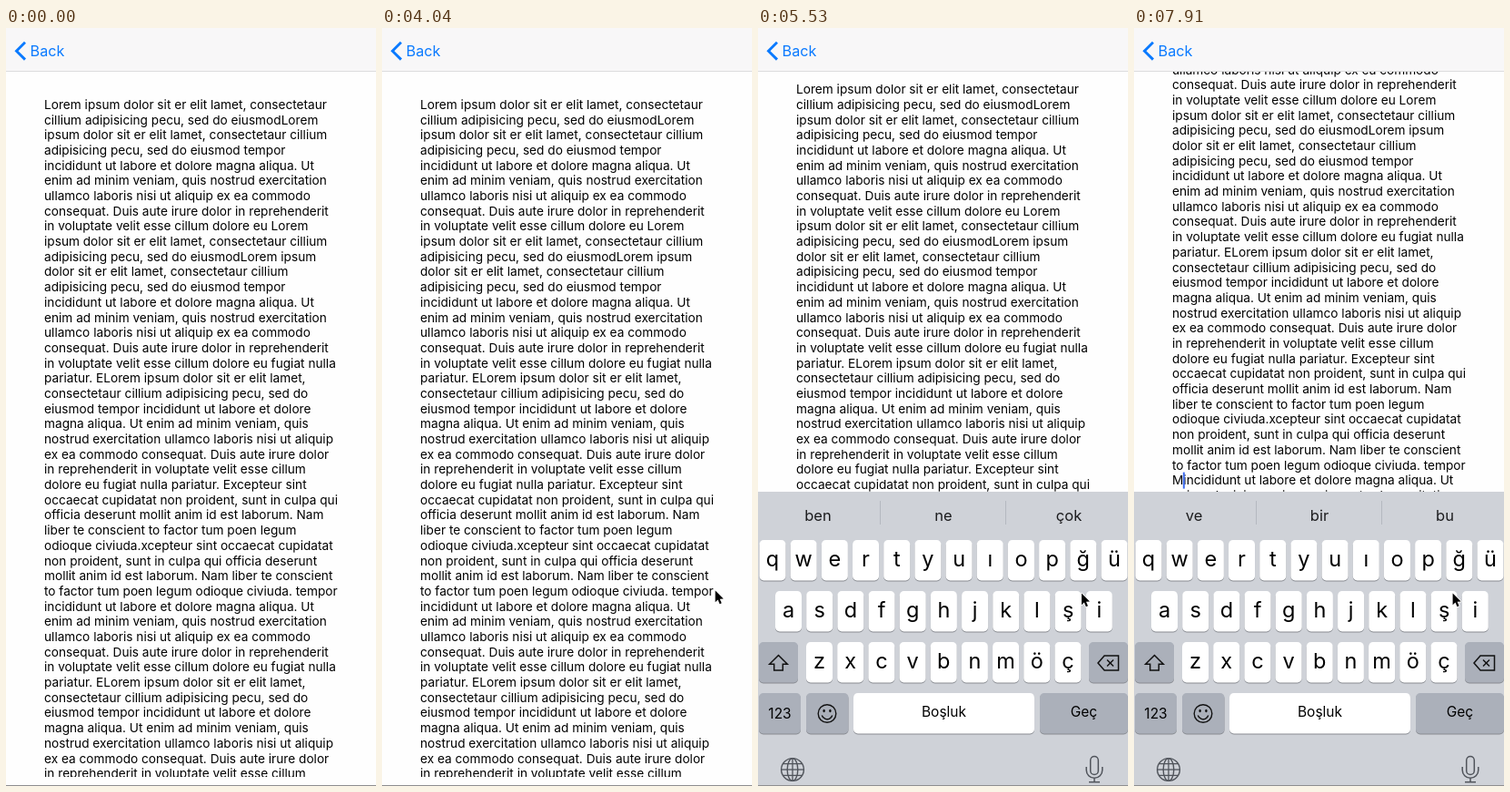
Write an HTML page with a canvas that moves like this. It is 407x832 px and loops after 8000 ms.

```html
<!DOCTYPE html>
<html lang="en">
<head>
<meta charset="utf-8">
<title>Text view with keyboard</title>
<style>
  html, body { margin: 0; width: 100%; height: 100%; overflow: hidden; background: #fefefe; }
  canvas { display: block; width: 407px; height: 832px; }
</style>
</head>
<body>
<canvas id="stage"></canvas>
<script>
const W = 407, H = 832, LOOP = 8000, STEP = 149.4;
const canvas = document.getElementById('stage');
const ctx = canvas.getContext('2d');
const ratio = window.devicePixelRatio || 1;
canvas.width = W * ratio;
canvas.height = H * ratio;

const FAMILY = 'Inter, "Liberation Sans", sans-serif';
const BLUE = '#0a7aff', ICON = '#50545b';
const BODY_SIZE = 13.67, TEXT_X = 42, FIRST_BASELINE = 88.85, LINE_HEIGHT = 16.69;
const KEYBOARD_TOP = 509, KEYBOARD_HEIGHT = H - KEYBOARD_TOP;

const lines = `Lorem ipsum dolor sit er elit lamet, consectetaur
cillium adipisicing pecu, sed do eiusmodLorem
ipsum dolor sit er elit lamet, consectetaur cillium
adipisicing pecu, sed do eiusmod tempor
incididunt ut labore et dolore magna aliqua. Ut
enim ad minim veniam, quis nostrud exercitation
ullamco laboris nisi ut aliquip ex ea commodo
consequat. Duis aute irure dolor in reprehenderit
in voluptate velit esse cillum dolore eu Lorem
ipsum dolor sit er elit lamet, consectetaur cillium
adipisicing pecu, sed do eiusmodLorem ipsum
dolor sit er elit lamet, consectetaur cillium
adipisicing pecu, sed do eiusmod tempor
incididunt ut labore et dolore magna aliqua. Ut
enim ad minim veniam, quis nostrud exercitation
ullamco laboris nisi ut aliquip ex ea commodo
consequat. Duis aute irure dolor in reprehenderit
in voluptate velit esse cillum dolore eu fugiat nulla
pariatur. ELorem ipsum dolor sit er elit lamet,
consectetaur cillium adipisicing pecu, sed do
eiusmod tempor incididunt ut labore et dolore
magna aliqua. Ut enim ad minim veniam, quis
nostrud exercitation ullamco laboris nisi ut aliquip
ex ea commodo consequat. Duis aute irure dolor
in reprehenderit in voluptate velit esse cillum
dolore eu fugiat nulla pariatur. Excepteur sint
occaecat cupidatat non proident, sunt in culpa qui
officia deserunt mollit anim id est laborum. Nam
liber te conscient to factor tum poen legum
odioque civiuda.xcepteur sint occaecat cupidatat
non proident, sunt in culpa qui officia deserunt
mollit anim id est laborum. Nam liber te conscient
to factor tum poen legum odioque civiuda. tempor`.split('\n');
// The passage repeats from its second "incididunt" line.
lines.push(...lines.slice(13, 25));
const EDIT_LINE = 33;

const pointerPath = [
  [2, 378, 787], [4, 366, 768], [6, 349, 748], [8, 340, 740], [9, 336, 717],
  [10, 341, 676], [11, 354, 641], [12, 361, 625], [14, 359, 620], [16, 359, 620],
  [18, 368, 609], [20, 378, 613], [22, 375, 624], [27, 366, 617], [31, 364, 618],
  [35, 356, 620], [38, 355, 620], [39, 350, 620], [40, 350, 620], [41, 352, 621],
  [42, 352, 621], [43, 350, 620], [54, 350, 620]
];

function pointerAt(step) {
  if (step < pointerPath[0][0]) return null;
  const i = pointerPath.findIndex(p => p[0] > step);
  const [s0, x0, y0] = pointerPath[i - 1], [s1, x1, y1] = pointerPath[i];
  const k = (step - s0) / (s1 - s0);
  return [x0 + (x1 - x0) * k, y0 + (y1 - y0) * k];
}

// Critically damped spring; returns the distance left to rise.
function keyboardOffset(step) {
  const s = Math.max(0, step - 33.15) * STEP / 1000 * 18;
  const rest = KEYBOARD_HEIGHT * (1 + s) * Math.exp(-s);
  return rest < 1.5 ? 0 : rest;
}

function scrollAt(step) {
  if (step < 37) return 0;
  if (step < 38) return 16.7;
  return step < 39 ? 92 : 138.4;
}

function caretAlpha(step) {
  if (step < 39) return 0;
  if (step === 43 || step === 49) return 0.4;
  return [44, 45, 50].includes(step) ? 0 : 1;
}

function label(text, x, y, size, align = 'center', color = '#000') {
  ctx.font = `400 ${size}px ${FAMILY}`;
  ctx.textAlign = align;
  ctx.fillStyle = color;
  ctx.fillText(text, x, y);
}

function rect(x, y, w, h, color) {
  ctx.fillStyle = color;
  ctx.fillRect(x, y, w, h);
}

function poly(points, closed = true) {
  ctx.beginPath();
  points.forEach(([x, y]) => ctx.lineTo(x, y));
  if (closed) ctx.closePath();
}

function stroke(color, width) {
  ctx.strokeStyle = color;
  ctx.lineWidth = width;
  ctx.stroke();
}

function at(x, y, draw) {
  ctx.save();
  ctx.translate(x, y);
  draw();
  ctx.restore();
}

function drawText(step) {
  const scroll = scrollAt(step), typed = step >= 51;
  const baseline = i => FIRST_BASELINE + i * LINE_HEIGHT - scroll;
  ctx.save();
  ctx.beginPath();
  ctx.rect(0, 48, W, 774);
  ctx.clip();
  lines.forEach((line, i) => {
    const text = typed && i === EDIT_LINE ? 'M' + line : line;
    label(text, TEXT_X, baseline(i), BODY_SIZE, 'left');
  });
  ctx.globalAlpha = caretAlpha(step);
  const x = typed ? TEXT_X + ctx.measureText('M').width - 0.5 : 365;
  rect(x, baseline(typed ? EDIT_LINE : EDIT_LINE - 1) - 13.6, 2, 18, '#416ff0');
  ctx.restore();
}

function drawHeader() {
  rect(0, 0, W, 48, '#f8f7f8');
  rect(0, 47, W, 1, '#dcdcdd');
  poly([[21, 15.8], [11.5, 25.2], [21, 34.6]], false);
  stroke(BLUE, 2.9);
  label('Back', 26.6, 31.2, 16.2, 'left', BLUE);
}

function key(x, y, w, color = '#fff') {
  for (const [dy, fill] of [[1, '#898c92'], [0, color]]) {
    ctx.beginPath();
    ctx.roundRect(x, y + dy, w, 44.5, 4.8);
    ctx.fillStyle = fill;
    ctx.fill();
  }
}

function keyRow(letters, firstX, y) {
  [...letters].forEach((letter, i) => {
    const x = firstX + i * 34.18;
    key(x - 14.5, y, 29);
    label(letter, x, y + 28.7, 23.5);
  });
}

function drawShift() {
  poly([[0, -8.5], [9.8, 1.2], [4.8, 1.2], [4.8, 8], [-4.8, 8], [-4.8, 1.2], [-9.8, 1.2]]);
  stroke('#111', 1.5);
}

function drawDelete() {
  poly([[-11.5, 0], [-4.5, -8], [11, -8], [11, 8], [-4.5, 8]]);
  stroke('#111', 1.5);
  for (const d of [-3.5, 3.5]) {
    poly([[2 - 3.5, -d], [2 + 3.5, d]], false);
    stroke('#111', 1.5);
  }
}

function drawSmiley() {
  ctx.beginPath();
  ctx.arc(0, 0, 9.8, 0, 7);
  stroke('#111', 1.4);
  ctx.fillStyle = '#111';
  for (const x of [-3.4, 3.4]) {
    ctx.beginPath();
    ctx.ellipse(x, -3, 1.2, 1.7, 0, 0, 7);
    ctx.fill();
  }
  ctx.beginPath();
  ctx.arc(0, 0.2, 6, 0.1 * Math.PI, 0.9 * Math.PI);
  stroke('#111', 1.4);
}

function drawGlobe() {
  for (const rx of [12.4, 5.8]) {
    ctx.beginPath();
    ctx.ellipse(0, 0, rx, 12.4, 0, 0, 7);
    stroke(ICON, 1.4);
  }
  for (const [x0, y0, x1, y1] of [[0, -12.4, 0, 12.4], [-12.4, 0, 12.4, 0],
    [-10.5, -6.4, 10.5, -6.4], [-10.5, 6.4, 10.5, 6.4]]) {
    poly([[x0, y0], [x1, y1]], false);
    stroke(ICON, 1.3);
  }
}

function drawMic() {
  ctx.beginPath();
  ctx.roundRect(-4.3, -14.5, 8.6, 20, 4.3);
  stroke(ICON, 1.5);
  ctx.beginPath();
  ctx.moveTo(-8.8, -3);
  ctx.lineTo(-8.8, 0.5);
  ctx.arc(0, 0.5, 8.8, Math.PI, 0, true);
  ctx.lineTo(8.8, -3);
  stroke(ICON, 1.5);
  poly([[0, 9.5], [0, 13.5]], false);
  stroke(ICON, 1.5);
  poly([[-6, 13.7], [6, 13.7]], false);
  stroke(ICON, 1.5);
}

function drawKeyboard(step) {
  const gray = '#abb0ba';
  const hints = step >= 52 ? ['ve', 'bir', 'bu'] : ['ben', 'ne', 'çok'];
  at(0, keyboardOffset(step), () => {
    rect(0, KEYBOARD_TOP, W, KEYBOARD_HEIGHT, '#cfd2d8');
    hints.forEach((word, i) => label(word, 66 + i * 138, 540.7, 16.5, 'center', '#1c1c1e'));
    for (const x of [134, 272]) rect(x, 519, 1, 26, '#b5b9c0');

    keyRow('qwertyuıopğü', 16, 562);
    keyRow('asdfghjklşi', 33.5, 618);
    keyRow('zxcvbnmöç', 67.5, 674);

    key(1, 674, 43, gray);
    key(364, 674, 43, gray);
    key(1, 730, 46, gray);
    key(53, 730, 46.5, gray);
    key(105, 730, 199);
    key(310, 730, 97, gray);
    label('123', 24, 757.5, 15.5);
    label('Boşluk', 204.5, 756.3, 15.5);
    label('Geç', 358.5, 756.3, 15.5);

    at(22.5, 697, drawShift);
    at(385.5, 697, drawDelete);
    at(76, 752.5, drawSmiley);
    at(38, 814, drawGlobe);
    at(370, 814, drawMic);
  });
}

function drawPointer(step) {
  const tip = pointerAt(step);
  if (!tip) return;
  at(tip[0] + 0.6, tip[1] + 0.6, () => {
    poly([[0, 0], [0, 12.7], [2.9, 10], [4.9, 14.6], [7, 13.7], [5, 9.2], [9, 9]]);
    ctx.lineJoin = 'round';
    stroke('#fff', 1.8);
    ctx.fillStyle = '#000';
    ctx.fill();
  });
}

function render(now) {
  const step = Math.floor((now % LOOP) / STEP);
  ctx.setTransform(ratio, 0, 0, ratio, 0, 0);
  rect(0, 0, W, H, '#fefefe');
  drawText(step);
  drawHeader();
  drawKeyboard(step);
  rect(0, 831, W, 1, '#8e8e90');
  drawPointer(step);
}

const start = performance.now();
function tick() {
  render(performance.now() - start);
  requestAnimationFrame(tick);
}
tick();
</script>
</body>
</html>
```
